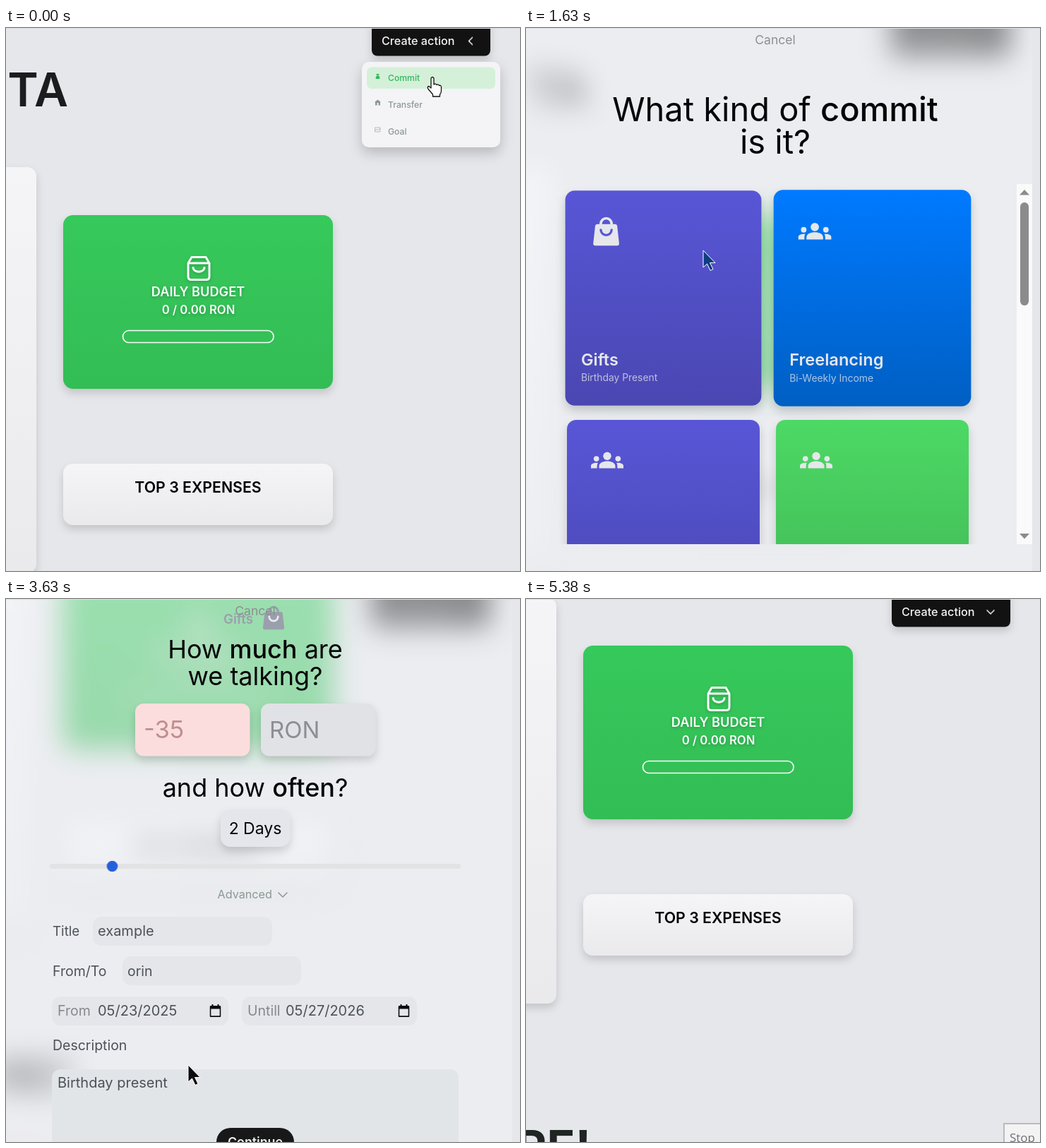
Write an HTML page that moves like this. It is 728 px wide and 769 px high and loops after 5.44 s.

```html
<!DOCTYPE html>
<html lang="en">
<head>
<meta charset="utf-8">
<title>Create a commit</title>
<style>
html, body { margin: 0; width: 100%; height: 100%; overflow: hidden; background: #e6e7eb; }
#stage { position: relative; width: 728px; height: 769px; overflow: hidden; background: #e6e7eb;
  font-family: Inter, "Open Sans", sans-serif; }
#stage::after { content: ""; position: absolute; inset: 0 0 auto; height: 1px; background: #dcdde1; }
svg { position: absolute; left: 0; top: 0; overflow: visible; }
.mid { text-anchor: middle; }
.semi { font-weight: 600; }
.med { font-weight: 500; }
.lift { filter: drop-shadow(0 6px 6px #00000026); }
.line { fill: none; stroke: currentColor; stroke-linecap: round; stroke-linejoin: round; }

#modal { position: absolute; inset: 0; }
#glass { position: absolute; inset: 0 11px 0 0; overflow: hidden; background: #e6e7eb; }
#glass svg { filter: blur(19px); }
#glass::after { content: ""; position: absolute; inset: 0; background: rgba(240, 242, 245, .54); }
#panel { position: absolute; left: -11px; right: 11px; top: 0; height: 769px; overflow: hidden; }
#cancel { position: absolute; top: 6px; width: 100%; text-align: center; font-size: 17.5px; line-height: 22px; color: #8e8e93; }
#pick { position: absolute; inset: 0; }
h1 { position: absolute; top: 92px; width: 100%; margin: 0; text-align: center; color: #050508;
  font: 400 47px/45.5px Inter, "Open Sans", sans-serif; }
h1 b { font-weight: 500; }
#list { position: absolute; left: 0; right: 0; top: 221px; height: 510px; overflow: hidden; }
#grid { position: absolute; left: 69px; right: 90px; top: 12px; display: grid; grid-template-columns: 1fr 1fr; gap: 23px; }
.card { position: relative; aspect-ratio: .914; border-radius: 13px; color: #e5e7eb;
  background: linear-gradient(var(--a), var(--b)); box-shadow: 0 7px 14px #0000002b; }
.card div { position: absolute; left: 22px; bottom: 50px; font: 600 23px/28px Inter, "Open Sans", sans-serif; }
.card p { position: absolute; left: 22px; bottom: 30px; margin: 0; font-size: 13.6px; line-height: 18px; opacity: .75; }
.card svg { left: 34px; top: 34px; }
.card .bag { left: 39px; top: 37px; }
.violet { --a: #5856d6; --b: #4a47b2; }
.blue { --a: #007aff; --b: #005fc3; }
.green { --a: #4cd964; --b: #41b556; }
</style>
</head>
<body>
<div id="stage">
  <svg width="728" height="769">
    <defs>
      <linearGradient id="paper" x2="0" y2="1"><stop stop-color="#f5f5f7"/><stop offset="1" stop-color="#eaeaec"/></linearGradient>
      <linearGradient id="leaf" x2="0" y2="1"><stop stop-color="#36c95b"/><stop offset="1" stop-color="#33bd55"/></linearGradient>
      <symbol id="bag" viewBox="0 0 36 40" overflow="visible">
        <path fill="currentColor" d="M5.500 9.500h25q2.500 0 2.800 2.500l2.700 24q.3 3.500-3 3.500H3Q-.3 39.500 0 36l2.700-24q.3-2.500 2.800-2.500Z"/>
        <path class="line" stroke-width="3.600" d="M10.500 12V9a7.500 7.500 0 0 1 15 0v3"/>
        <path class="line" style="stroke:var(--a)" stroke-width="3.200" d="M10.500 17.500a7.500 7.500 0 0 0 15 0"/>
      </symbol>
      <symbol id="people" viewBox="0 0 24 24">
        <g fill="currentColor">
          <circle cx="12" cy="9" r="3"/><circle cx="4" cy="11" r="2"/><circle cx="20" cy="11" r="2"/>
          <path d="M6 18v-1.600c0-2.400 3-3.650 6-3.650s6 1.250 6 3.650V18ZM0 18v-1.600C0 14.500 2.800 13.700 5.100 14.100a4.500 4.500 0 0 0-.6 2.300V18ZM24 18v-1.600c0-1.900-2.800-2.700-5.100-2.300a4.500 4.500 0 0 1 .6 2.300V18Z"/>
        </g>
      </symbol>
      <symbol id="calendar" viewBox="0 0 16 18">
        <path fill="#0b0b0d" d="M3 0h2v2h6V0h2v2h1.500q1.500 0 1.500 1.500v13q0 1.500-1.500 1.500h-13Q0 18 0 16.500v-13Q0 2 1.500 2H3Z"/>
        <path fill="#e4e6ea" d="M1.800 6.500h12.400v9.700H1.800Z"/>
      </symbol>
    </defs>
    <g id="scene">
      <g class="page">
        <text x="88" y="111" text-anchor="end" font-size="66" class="semi" fill="#1c1c1e">TA</text>
        <rect class="lift" x="-60" y="197" width="103" height="575" rx="13" fill="url(#paper)"/>
        <rect class="lift" x="81" y="265" width="382" height="246" rx="14" fill="url(#leaf)"/>
        <g class="mid semi" fill="#fafafa" color="#fafafa" style="filter:drop-shadow(0 2px 2px #0003)">
          <path class="line" stroke-width="3" d="M258 333v19q0 4.500 4.500 4.500h21q4.500 0 4.500-4.500v-19l-5-8.500h-20ZM258 333h30M265 339.500c1 7.500 15 7.500 16 0"/>
          <text x="272" y="379.500" font-size="18.200">DAILY BUDGET</text>
          <text x="272.500" y="405" font-size="16.700">0 / 0.00 RON</text>
        </g>
        <rect x="165.500" y="428.500" width="213.500" height="17" rx="8.500" fill="none" stroke="#fafafa" stroke-width="1.700"/>
        <rect class="lift" x="81" y="617" width="382" height="87" rx="14" fill="url(#paper)"/>
        <text class="mid semi" x="272" y="658" font-size="21.300">TOP 3 EXPENSES</text>
        <text x="92" y="999" text-anchor="end" font-size="66" font-weight="700" fill="#1f2522">RE!</text>
        <rect x="-60" y="1085" width="103" height="300" rx="13" fill="#ffc4c4"/>
      </g>
      <rect class="lift" x="518" y="-45" width="168" height="84.500" rx="8" fill="#121213"/>
      <text class="med" x="532" y="24" font-size="16.200" fill="#f4f4f5">Create action</text>
      <g transform="translate(658 18.500)" color="#f4f4f5"><path class="line actionArrow" stroke-width="1.500" d="M-5-2.500 0 2.500 5-2.500"/></g>
      <g class="med menu" font-size="12.200" fill="#8d9992">
        <rect x="504" y="48" width="196" height="121" rx="10" fill="#f4f4f6" style="filter:drop-shadow(0 8px 9px #0003)"/>
        <rect x="511" y="55.500" width="182" height="30.500" rx="7" fill="#d4f0d9"/>
        <path fill="#34b75c" d="M524 65h5l-1.500 2h-2ZM525 67.500h3q3 4.500 0 4.500h-3q-3 0 0-4.500Z"/>
        <path d="m522 105 4.500-3.500 4.500 3.500h-1v4.500h-2.500V106h-2v3.500H523V105Z"/>
        <path class="line" color="#b5bdb8" d="M523 141h7v6h-7Zm0 4 2-1.500 2 1 3-2"/>
        <text x="541" y="75" fill="#34b75c">Commit</text>
        <text x="541" y="112.500">Transfer</text>
        <text x="541" y="150.500">Goal</text>
      </g>
    </g>
  </svg>

  <div id="modal">
    <div id="glass"><svg id="blurred" width="728" height="769"></svg></div>
    <div id="panel">
      <div id="pick">
        <h1>What kind of <b>commit</b><br>is it?</h1>
        <div id="list">
          <div id="grid">
            <div class="card violet" id="gifts"><svg class="bag" width="36" height="40"><use href="#bag"/></svg><div>Gifts</div><p>Birthday Present</p></div>
            <div class="card blue" id="freelance"><svg width="46" height="46"><use href="#people"/></svg><div>Freelancing</div><p>Bi-Weekly Income</p></div>
            <div class="card violet"><svg width="46" height="46"><use href="#people"/></svg></div>
            <div class="card green"><svg width="46" height="46"><use href="#people"/></svg></div>
          </div>
          <svg width="22" height="510" style="left:auto;right:0" fill="#8b8b8b">
            <rect width="22" height="510" fill="#fafafa"/>
            <path d="M4 15.500 11 8l7 7.500ZM4 495l7 7.500 7-7.500Z"/>
            <rect x="5" y="26" width="12" height="146" rx="6"/>
          </svg>
        </div>
      </div>

      <svg id="form" width="728" height="769" style="left:11px">
        <g id="fields" font-size="19.500" fill="#4c5257">
          <text class="semi" x="308" y="171" font-size="18.600" fill="#9a9fac">Gifts</text>
          <svg x="364" y="146" width="30" height="34" color="#9a9fac" style="--a:#ebecf0"><use href="#bag"/></svg>
          <g class="mid" font-size="36" fill="#050508">
            <text x="353" y="220">How <tspan class="med">much</tspan> are</text>
            <text x="353" y="258">we talking?</text>
            <text x="353" y="416">and how <tspan class="med">often</tspan>?</text>
          </g>
          <g class="lift">
            <rect x="183" y="284" width="162.500" height="74.500" rx="12" fill="#fcdddd"/>
            <rect x="361" y="284" width="162.500" height="74.500" rx="12" fill="#e1e2e6"/>
            <rect x="304" y="434" width="98.500" height="53" rx="14" fill="#e4e6eb"/>
          </g>
          <text x="195" y="333" font-size="34.500" fill="#bd8f92">-35</text>
          <text x="373" y="333" font-size="33" fill="#8d8e93">RON</text>
          <text id="often" class="mid" x="353" y="469" font-size="23" fill="#050508"></text>
          <rect x="62" y="511" width="582" height="7" rx="3.500" fill="#e2e3e4"/>
          <circle id="thumb" cy="514.500" r="7.800" fill="#2560dc"/>
          <g id="advanced" fill="#55585c" color="#55585c">
            <text x="299.500" y="560" font-size="16.200">Advanced</text>
            <g transform="translate(392 555)"><path id="advArrow" class="line" stroke-width="1.500" d="M-6-3 0 3 6-3"/></g>
          </g>
          <g id="row1">
            <rect x="123" y="586" width="254" height="41" rx="12" fill="#e5e6ea"/>
            <text x="66" y="613" font-size="18.800">Title</text><text id="title" x="130" y="613" font-size="20"></text>
          </g>
          <g id="row2">
            <rect x="165" y="642" width="253" height="41" rx="12" fill="#e4e6ea"/>
            <text x="66" y="670">From/To</text><text id="who" x="172" y="670"></text>
          </g>
          <g id="row3">
            <rect x="65" y="699" width="250" height="41" rx="12" fill="#e4e6ea"/>
            <rect x="334" y="699" width="248" height="41" rx="12" fill="#e4e6ea"/>
            <g fill="#85898d"><text x="73" y="726">From</text><text x="342" y="726">Untill</text></g>
            <g font-size="20"><text id="from" x="130" y="726"></text><text id="until" x="396" y="726"></text></g>
            <use href="#calendar" x="288.500" y="710" width="16" height="18"/>
            <use href="#calendar" x="555.500" y="710" width="16" height="18"/>
          </g>
          <g id="row4">
            <text x="66" y="775">Description</text>
            <rect x="65" y="802" width="576" height="150" rx="12" fill="#e2e5e8"/>
            <text id="note" x="73" y="828" font-size="20"></text>
          </g>
        </g>
        <rect x="298" y="749" width="110" height="46" rx="20" fill="#18181a"/>
        <text class="mid semi" x="353" y="775" font-size="17.800" fill="#e9f5ec">Continue</text>
      </svg>
      <div id="cancel">Cancel</div>
    </div>
  </div>

  <svg id="stop" width="728" height="769">
    <rect x="677" y="743" width="60" height="40" fill="#f3f3f4" stroke="#b9babd" stroke-width="2"/>
    <text x="685" y="769" font-size="17" font-family="Open Sans, sans-serif" fill="#6f7175">Stop</text>
  </svg>
  <svg id="cursor" width="1" height="1" stroke="#fff">
    <path id="arrow" fill="#0b0b0d" d="M0 0V24l5.500-5 4.500 9.500 4-2-4.500-9H17Z"/>
    <path id="hand" fill="#fff" stroke="#111" stroke-width="1.300" stroke-linejoin="round" d="M0 2Q2-1 4 2V11q2-2 4 .5 2-1.500 3.500 1 2.500-1 3 2V20q0 3-2 5v3H2.500v-3L-4 17.500Q-6 14-3 13.500L0 16Z"/>
  </svg>
</div>

<script>
const LOOP = 5440;
const byId = id => document.getElementById(id);

// The modal shows a blurred twin of the scene behind it.
const twin = byId('scene').cloneNode(true);
twin.removeAttribute('id');
byId('blurred').append(twin);

// steps: [time, properties, easing to the next step]
function play(selector, steps) {
  const first = steps[0], last = steps[steps.length - 1];
  const frames = [[0, first[1]], ...steps, [LOOP, last[1]]].map(
    ([time, props, easing = 'linear']) => ({ offset: time / LOOP, easing, ...props }));
  const parts = [...document.querySelectorAll(selector)];
  return parts.map(part => part.animate(frames, { duration: LOOP, iterations: Infinity }))[0];
}
const fade = (selector, ...steps) => play(selector, steps.map(([time, opacity]) => [time, { opacity }]));
const at = (time, x, y, easing = 'ease-in-out') => [time, { transform: `translate(${x}px, ${y}px)` }, easing];
const turn = (time, deg) => [time, { transform: `rotate(${deg}deg)` }];
const size = (time, scale) => [time, { transform: `scale(${scale})` }];
const tint = (time, color) => [time, { fill: color, color }];

const clock = play('.page', [
  at(3230, 0, 0), at(3500, 0, -308, 'linear'), at(5190, 0, -199)
]);
play('.actionArrow', [turn(70, 90), turn(280, 0)]);
fade('.menu', [70, 1], [320, 0]);

const edges = [[70, 130], [490, 15], [760, -11]];
play('#panel', edges.map(([time, x]) => [time, { left: `${x}px` }, 'ease-out']));
play('#glass', edges.map(([time, x]) => [time, { clipPath: `inset(0 0 0 ${x}px)` }, 'ease-out']));
fade('#modal', [70, 0], [490, .91], [620, 1], [4620, 1], [4960, 0]);
fade('#pick', [1840, 1], [2050, 0]);
play('#freelance', [size(1190, 1), size(1340, 1.05), size(1550, 1.05), size(1710, 1)]);
play('#gifts', [size(1560, 1), size(1760, 1.05)]);

fade('#form', [1980, 0], [2290, 1]);
play('#fields', [at(3060, 0, 0), at(3260, 0, -136)]);
play('#thumb', [at(2480, 70, 0), at(2640, 150.5, 0)]);
play('#advArrow', [turn(2960, 90), turn(2990, 68), turn(3160, 0)]);
play('#advanced', [tint(3060, '#55585c'), tint(3200, '#8b9891')]);
fade('#row1', [2930, 0], [2990, 1]);
['#row2', '#row3', '#row4'].forEach((row, i) => fade(row, [3000 + 50 * i, 0], [3120 + 50 * i, 1]));

play('#cursor', [
  at(630, 602, 69), at(1190, 520, 340), at(1420, 470, 350), at(1630, 251, 315),
  at(2330, 251, 315), at(2480, 72, 512), at(2640, 150, 512), at(2880, 327, 583),
  at(3060, 327, 583), at(3300, 258, 660), at(4480, 258, 660), at(4640, 352, 757),
  at(4780, 352, 757), at(4920, 352, 800)
]);
fade('#hand', [0, 1], [280, 1], [280, 0], [2760, 0], [2760, 1], [3120, 1], [3120, 0]);
fade('#arrow', [0, 0], [280, 0], [280, 1], [2760, 1], [2760, 0], [3120, 0], [3120, 1]);
play('#arrow', [
  tint(1560, '#0b0b0d'), tint(1620, '#103c80'), tint(1840, '#103c80'), tint(1900, '#0b0b0d')
]);
fade('#stop', [5375, 0], [5375, 1]);

// [id, time, text before, text typed, ms per letter]
const typing = [
  ['often', 2560, '1 Day', '2 Days', 0],
  ['title', 3100, 'gifts', 'example', 15],
  ['who', 3220, '', 'orin', 20],
  ['from', 3310, 'mm/dd/yyyy', '05/23/2025', 0],
  ['until', 3350, 'mm/dd/yyyy', '05/27/2026', 0],
  ['note', 3340, '', 'Birthday present', 9]
];
function tick() {
  const time = (clock.currentTime || 0) % LOOP;
  for (const [id, start, before, text, pace] of typing) {
    const letters = pace ? Math.floor((time - start) / pace) : text.length;
    byId(id).textContent = time < start ? before : text.slice(0, letters);
  }
  requestAnimationFrame(tick);
}
tick();
</script>
</body>
</html>
```
